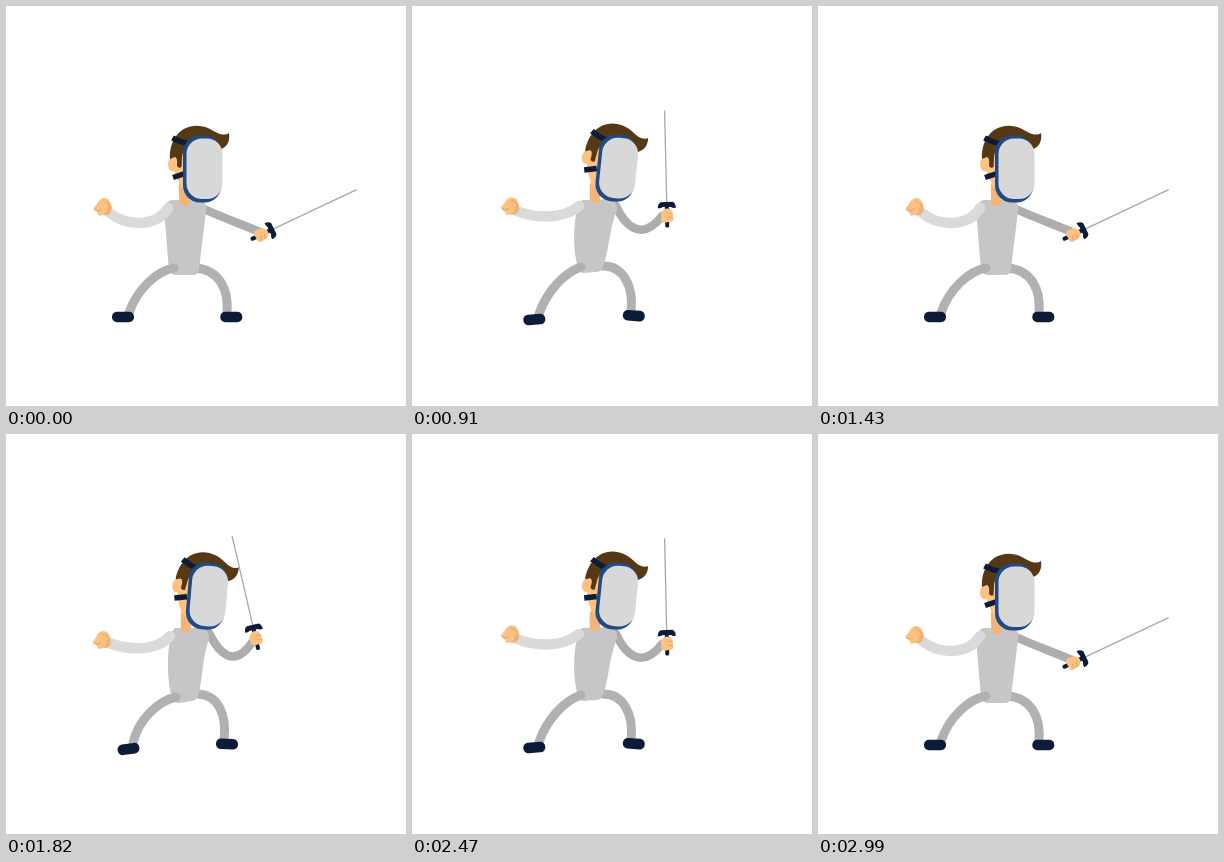
Write an HTML page that moves like this. It is 400x400 px and loops after 3.12 s.

```html
<!DOCTYPE html>
<html lang="en">
<head>
<meta charset="utf-8">
<title>Fencer</title>
<style>
  html, body { margin: 0; width: 100%; height: 100%; overflow: hidden; background: #fff; }
  svg { display: block; width: 100vw; height: 100vh; }
  .limb { fill: none; stroke-width: 9; stroke-linecap: round; }
  .grey { stroke: #b1b1b1; }
  .navy { fill: #0c1b37; }
  .skin { fill: #fdc182; }
  .shade { fill: #ecb27a; }
  .hair { fill: #563815; }
  .strap { fill: none; stroke: #0c1b37; stroke-width: 5.5; }
  .crease { fill: none; stroke: #e6a86c; stroke-width: 1.2; stroke-linecap: round; }
</style>
</head>
<body>
<svg viewBox="0 0 400 400">
  <path id="swordArm" class="limb" stroke="#adadad" style="stroke-width:8.5"/>
  <path id="frontLeg" class="limb grey"/>
  <path id="torso" fill="#c6c6c6"/>
  <path id="backLeg" class="limb grey"/>
  <rect id="backFoot" class="navy" x="-11" y="-5.3" width="22" height="10.6" rx="5"/>
  <rect id="frontFoot" class="navy" x="-11" y="-5.3" width="22" height="10.6" rx="5"/>
  <path id="backArm" class="limb" stroke="#dadada" style="stroke-width:10.5"/>

  <g id="fist">
    <path class="skin" d="M-10 2L-6 -3Q-5 -7 0 -9Q6 -9 7 -5Q10 -1 8 5Q5 9 0 8L-4 9L-6 5Z"/>
    <path class="shade" d="M0 8Q4 6 4 1L7 -3Q9 1 8 5Q5 9 0 8Z"/>
    <path class="crease" d="M-8 3Q-4 5 -2 2M0 -6Q5 -5 6 -2"/>
  </g>

  <path id="neck" class="limb" stroke="#f3b577" style="stroke-width:10.500"/>

  <!-- head is drawn around its pivot at the hair centre -->
  <g id="head">
    <path class="skin" d="M-25 8L-4 0L-4 55Q-15 52 -19 43L-24 34Z"/>
    <ellipse class="skin" cx="-26" cy="23.500" rx="5" ry="7"/>
    <path class="hair" d="M-29 18C-30 4 -23 -15 -2 -15.300C11 -15 15 -8 23 -6.500Q28 -6 30 -8Q32 5 20 9L-13 8Q-17 11 -17 17L-17.500 26Q-20 28 -22 25Q-21 17 -24 16Z"/>
    <path class="strap" d="M-26.500 -3Q-18 1.500 -10 3"/>
    <path class="strap" d="M-26 36.500L-14 32.500"/>
  </g>

  <g id="mask">
    <rect x="-20" y="-33.500" width="38.500" height="67" rx="17" fill="#1f4a86"/>
    <rect x="-16.500" y="-30.500" width="36" height="60.500" rx="15.500" fill="#d8d8d8"/>
  </g>

  <g id="sword">
    <path d="M0 -13V-105.500" stroke="#a8a8a8" stroke-width="1.3"/>
    <rect class="navy" x="-2" y="-12" width="4" height="23.500" rx="1.500"/>
    <path class="navy" d="M-6 -14H6Q9 -12.500 9 -8Q6 -7.500 4 -9H-4Q-6 -7.500 -9 -8Q-9 -12.500 -6 -14Z"/>
    <path class="skin" d="M-6 -3Q-3 -8 1 -7.500Q6 -6 6 -2L6.500 4Q5 7 1 6Q-4 8 -6 4Z"/>
    <path class="crease" d="M1 -3L5 -2M1 1L5 2"/>
  </g>
</svg>

<script>
  // Each part in three key poses: lunge, recoil, guard.
  const rig = {
    swordArm: ["M198 203C215 211 235 218 254 226", "M203 199C213 219 228 236 247 207", "M204 200C214 222 231 235 250 210"],
    frontLeg: ["M190 262C213 264 223 283 221 307", "M192 260C212 261 221 280 218 306", "M190 260C211 259 222 280 219 306"],
    torso: [
      "M165 194L196 194Q201 197 200 204L193 264Q192 269 187 269L169 269Q164 268 163 263L158 205Q158 197 165 194Z",
      "M169 194L197 194Q204 197 203 205C196 224 197 245 192 262Q190 267 185 267L173 269Q168 269 166 264C161 247 161 222 164 205Q165 197 169 194Z",
      "M170 194L199 193Q206 197 205 204C197 224 197 245 191 261Q189 266 184 266L172 267Q168 267 166 262C161 245 161 222 165 204Q166 197 170 194Z"
    ],
    backLeg: ["M168 262C151 265 131 283 123 307", "M170 263C152 267 132 286 127 309", "M169 261C152 267 135 285 127 308"],
    backFoot: ["translate(117 311) rotate(0)", "translate(122.5 315) rotate(-8)", "translate(122.3 313.5) rotate(-4)"],
    frontFoot: ["translate(225.3 311) rotate(0)", "translate(221 310) rotate(2)", "translate(221.8 309.7) rotate(4)"],
    backArm: ["M104 207C120 220 150 222 162 202", "M103 209C122 216 150 218 164 202", "M105 205C122 212 150 214 167 200"],
    fist: ["translate(97 201) rotate(0)", "translate(96.2 206) rotate(-3)", "translate(98.6 200.3) rotate(3)"],
    neck: ["M178 180L178.5 195", "M180 180L180 193", "M183 180L183 192"],
    head: ["translate(193 135) rotate(0)", "translate(201.9 134.3) rotate(13)", "translate(205.2 133.6) rotate(12)"],
    mask: ["translate(197 163) rotate(0)", "translate(201.3 162.2) rotate(5)", "translate(205.1 162.2) rotate(6)"],
    sword: ["translate(255.2 228.6) rotate(64.8)", "translate(249.8 204.6) rotate(-13)", "translate(255 210) rotate(-1.3)"]
  };
  const steps = [0, 0.6, 1, 1.6, 2, 2.12]; // position along the key poses
  const stepMs = 130;
  const number = /-?\d+(\.\d+)?/g;

  function blend(from, to, k) {
    const ends = to.match(number);
    let i = 0;
    return from.replace(number, n => (+n + (ends[i++] - n) * k).toFixed(2));
  }

  // The first torso outline has straight sides; give it the same curve commands as the others.
  rig.torso[0] = rig.torso[0]
    .replace("L193 264", "C198 224 195 244 193 264")
    .replace("L158 205", "C161 244 160 224 158 205");

  function pose(u) {
    const key = u < 1 ? 0 : 1;
    for (const [id, keys] of Object.entries(rig)) {
      const name = keys[0].startsWith("M") ? "d" : "transform";
      document.getElementById(id).setAttribute(name, blend(keys[key], keys[key + 1], u - key));
    }
  }

  // Play the steps forwards, then backwards, resting twice as long at both ends.
  let shown = -1;
  function draw(now) {
    const slot = Math.floor(now / stepMs) % (steps.length * 2);
    const step = Math.min(slot, steps.length * 2 - 1 - slot);
    if (step !== shown) pose(steps[shown = step]);
  }

  const start = performance.now();
  function tick() {
    draw(performance.now() - start);
    requestAnimationFrame(tick);
  }
  tick();
</script>
</body>
</html>
```
